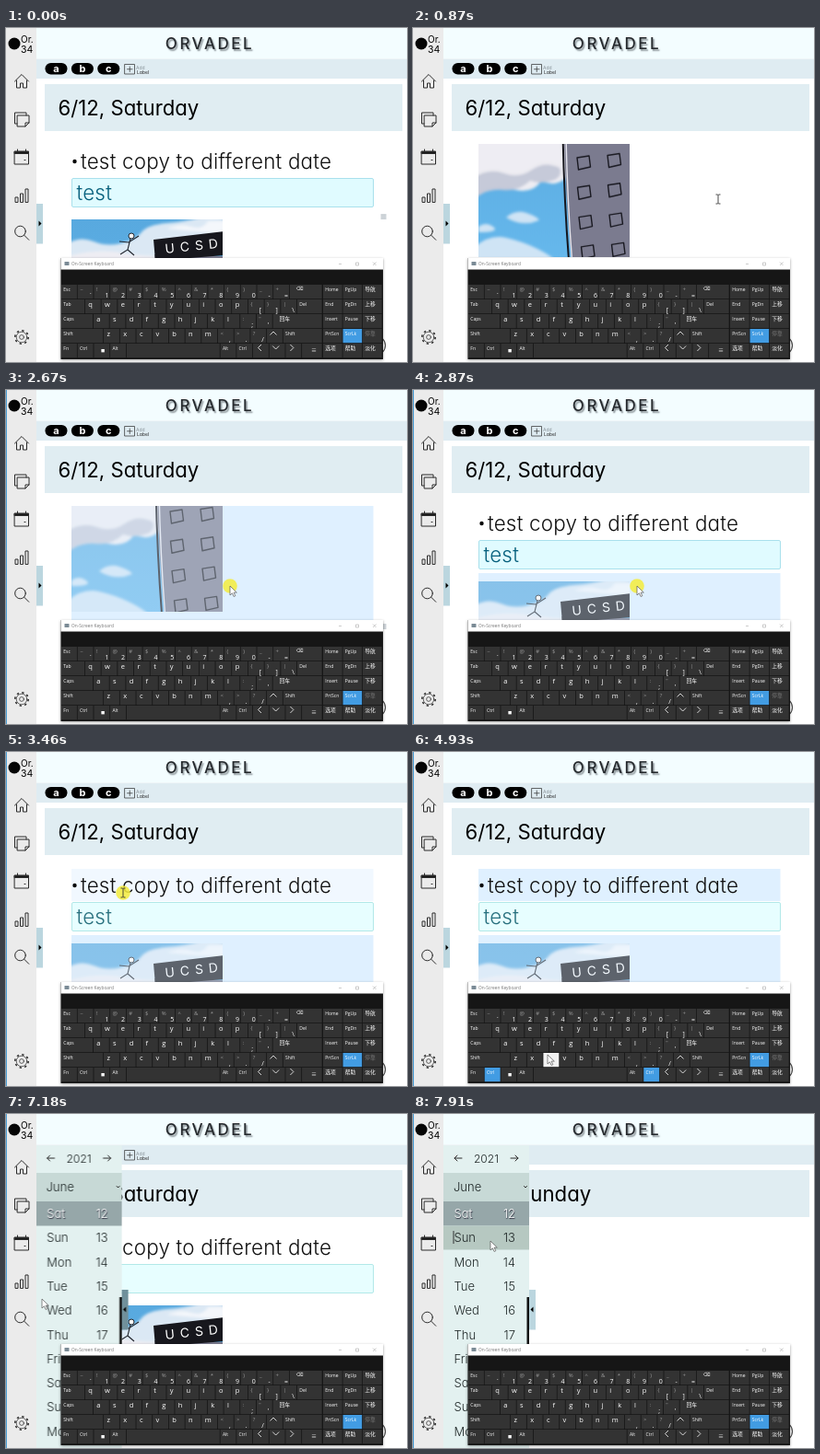
Recreate the animation shown at these times as an HTML page. Size 435 px wide and 363 px high, loop 8 s.

```html
<!DOCTYPE html>
<html lang="en">
<head>
<meta charset="utf-8">
<title>Planner</title>
<style>
html, body { margin: 0; width: 100%; height: 100%; overflow: hidden; background: #fff; }
body > svg { display: block; width: 435px; height: 363px; }
text { font-family: Inter, Lato, sans-serif; font-feature-settings: "cv11"; }
.line { fill: none; stroke: #2a2a2a; stroke-width: 1; stroke-linecap: round; stroke-linejoin: round; }
.brand { font-size: 17px; font-weight: 500; letter-spacing: 2.5px; fill: #25292d; text-shadow: 1.5px 1.5px 1.5px #8b9499; }
.date { font-size: 22.2px; fill: #000; }
.note { font-size: 22.4px; font-weight: 300; letter-spacing: .2px; fill: #111; }
.pill { font: 700 11px Inter, sans-serif; fill: #fff; text-anchor: middle; }
.side text { font-size: 13px; font-weight: 300; fill: #1e2626; }
.side .num { text-anchor: end; }
.side .chosen { fill: #fff; text-shadow: .6px .6px 1px #223; }
.keys text { font-family: "Open Sans", "Noto Sans", "Noto Sans CJK SC", "Noto Sans CJK", sans-serif; fill: #fff; }

/* one loop of 8 s: 1% is 80 ms */
.move, .hard { animation-duration: 8s; animation-iteration-count: infinite; }
.move { animation-timing-function: linear; }
.hard { animation-timing-function: step-end; }

#scroll { animation-name: scroll; }
@keyframes scroll {
  0%, 1% { transform: translateY(0); animation-timing-function: ease-in-out; }
  10.875% { transform: translateY(-130px); animation-timing-function: ease-out; }
  13.75%, 33.6% { transform: translateY(-139px); animation-timing-function: ease-in-out; }
  35.875%, 100% { transform: translateY(0); }
}
#cursor { animation-name: cursor; animation-timing-function: ease-in-out; }
@keyframes cursor {
  0%, 2.5% { transform: translate(418px, 346px); }
  8.75%, 11.1% { transform: translate(331px, 186px); }
  20.75%, 26% { transform: translate(303px, 233px); }
  33.3%, 36.25% { transform: translate(243px, 213px); }
  43.2% { transform: translate(127px, 153px); }
  46.1%, 50% { transform: translate(123px, 148px); }
  54.75%, 56.5% { transform: translate(88px, 346px); }
  59.5%, 70% { transform: translate(146px, 329px); }
  72.5%, 73.75% { transform: translate(88px, 346px); }
  79.75%, 90.5% { transform: translate(39px, 201px); }
  96.25%, 100% { transform: translate(84px, 138px); }
}
#arrow { animation-name: arrow; }
@keyframes arrow { 0% { opacity: 0 } 2.5% { opacity: 1 } 5% { opacity: 0 } 26% { opacity: 1 } 41% { opacity: 0 } 50.5%, 100% { opacity: 1 } }
#beam { animation-name: beam; }
@keyframes beam { 0% { opacity: 0 } 5% { opacity: 1 } 26% { opacity: 0 } 41% { opacity: 1 } 50.5%, 100% { opacity: 0 } }
#halo { animation-name: halo; }
@keyframes halo { 0% { opacity: 0 } 26% { opacity: 1 } 48% { opacity: 0 } 50% { opacity: 1 } 60% { opacity: 0 } 70% { opacity: 1 } 84.4% { opacity: 0 } 90.5% { opacity: 1 } 96.5%, 100% { opacity: 0 } }

#pick1 { animation-name: pick1; }
@keyframes pick1 { 0%, 41.5% { opacity: 0 } 43.25% { opacity: .45 } 46%, 84.9% { opacity: 1 } 86%, 100% { opacity: 0 } }
#pick3 { animation-name: pick3; }
@keyframes pick3 { 0%, 26.5% { opacity: 0 } 28%, 84.9% { opacity: 1 } 86%, 100% { opacity: 0 } }
#photo { animation-name: photo; }
@keyframes photo { 0%, 26.5% { opacity: 1 } 28%, 74.5% { opacity: .65 } 76%, 100% { opacity: 1 } }
#field { animation-name: field; }
@keyframes field { 0% { fill: #e0fbff; stroke: #a9e0ec } 35.9%, 100% { fill: #e7feff; stroke: #b2e8e8 } }
#fieldText { animation-name: fieldText; }
@keyframes fieldText { 0% { fill: #07607d } 35.9%, 100% { fill: #28707e } }
#grip1 { animation-name: grip1; }
@keyframes grip1 { 0% { opacity: 1 } 1.5%, 100% { opacity: 0 } }
#grip2 { animation-name: grip2; }
@keyframes grip2 { 0% { opacity: 0 } 26.5% { opacity: 1 } 35%, 100% { opacity: 0 } }
#edge { animation-name: edge; }
@keyframes edge { 0% { opacity: 0 } 11.2%, 100% { opacity: 1 } }

.ctrlHit { animation-name: ctrlHit; }
@keyframes ctrlHit { 0% { opacity: 0 } 55.6% { opacity: 1 } 73%, 100% { opacity: 0 } }
.cHit { animation-name: cHit; }
@keyframes cHit { 0% { opacity: 0 } 60.1% { opacity: 1 } 66.7%, 100% { opacity: 0 } }

#side { animation-name: side; animation-timing-function: ease-in-out; }
@keyframes side { 0%, 85% { transform: translateX(-93px) } 90%, 100% { transform: translateX(0) } }
#tab { animation-name: tab; }
@keyframes tab { 0% { fill: #bbd6df } 79.5% { fill: #70909b } 91.5%, 100% { fill: #bbd6df } }
#right { animation-name: right; }
@keyframes right { 0% { opacity: 1 } 79.5%, 100% { opacity: 0 } }
#left { animation-name: left; }
@keyframes left { 0% { opacity: 0 } 88%, 100% { opacity: 1 } }
#hover { animation-name: hover; }
@keyframes hover { 0% { opacity: 0 } 95.6%, 100% { opacity: 1 } }
#before { animation-name: before; }
@keyframes before { 0% { opacity: 1 } 98.6%, 100% { opacity: 0 } }
#after { animation-name: after; }
@keyframes after { 0% { opacity: 0 } 98.6%, 100% { opacity: 1 } }
</style>
</head>
<body>
<svg viewBox="0 0 435 363" xmlns="http://www.w3.org/2000/svg">
  <defs>
    <clipPath id="page"><rect x="42" y="126" width="393" height="230"/></clipPath>
    <clipPath id="drawer"><rect x="33" y="34" width="402" height="329"/></clipPath>
    <linearGradient id="sky" x2="0" y2="1"><stop stop-color="#58a9df"/><stop offset="1" stop-color="#66b8ec"/></linearGradient>
    <filter id="soft"><feGaussianBlur stdDeviation="1.6"/></filter>
    <filter id="shade" x="-5%" y="-10%" width="110%" height="120%"><feDropShadow dx="0" dy="1" stdDeviation="1.5" flood-opacity=".4"/></filter>
    <g id="grip" fill="#8a99a3"></g>
  </defs>

  <rect width="435" height="363" fill="#fff"/>
  <rect x="33" width="402" height="33" fill="#f3fdff"/>
  <rect x="33" y="33.500" width="402" height="21.500" fill="#dfecf2"/>
  <rect x="42" y="61" width="388" height="51" fill="#e0edf2"/>
  <text class="brand" x="221" y="23" text-anchor="middle">ORVADEL</text>
  <circle cx="401" cy="345" r="10.500" fill="#fff" stroke="#444" stroke-width="1.100"/>

  <text id="after" class="date hard" x="56.500" y="95">6/13, Sunday</text>

  <g id="before" class="hard">
    <g id="pills"></g>
    <path class="line" d="M129 39.500h10.500v10.500h-10.500zM131.500 44.750h5.500M134.250 42v5.500" style="stroke-width:.7"/>
    <text x="141" y="45" font-size="5" fill="#8a949a">Add</text>
    <text x="142" y="50" font-size="5" fill="#222">Label</text>
    <text class="date" x="56.500" y="95">6/12, Saturday</text>

    <g clip-path="url(#page)">
      <g id="scroll" class="move">
        <rect id="pick1" class="move" x="71" y="127" width="327.500" height="35" fill="#dff0ff"/>
        <circle cx="74.500" cy="145" r="2.200"/>
        <text class="note" x="81" y="152.500">test copy to different date</text>
        <rect id="field" class="hard" x="71.500" y="163.500" width="327" height="31" rx="1.500"/>
        <text id="fieldText" class="note hard" x="76.500" y="187">test</text>
        <rect id="pick3" class="move" x="71" y="199" width="327.500" height="191" fill="#dff0ff"/>
        <g id="photo" class="move">
          <svg x="71" y="208" width="164" height="172">
            <rect width="164" height="172" fill="url(#sky)"/>
            <g filter="url(#soft)">
              <path d="M-4 26q14-8 28-2t30 2 22-12 28-10 34-6 30 2v26H96L90 60H-4z" fill="#dbe8f4"/>
              <path d="M104 10q14-6 26-2t18-6h20v14z" fill="#f4f7fb"/>
              <path d="M-4 40q30-8 56-4t44 4v44q-12 12-28 4-8 14-28 10T-4 104z" fill="#eeedf3"/>
              <path d="M-4 84q16-10 32-4t30-4 30-2q4 10-8 14-12 4-24 0-12 12-30 10T-4 108z" fill="#c6cad9"/>
              <path d="M30 128q10-9 22-5t14 8q-18 8-36-3zM-4 160q16-14 34-10t34 12 20 14H-4zM0 138q8-6 16 0t-16 6z" fill="#cfe4f5"/>
            </g>
            <path d="M93 40H166V174H101Q94 100 93 40z" fill="#7b7b8f"/>
            <path d="M91.500 38Q93 110 98 174" fill="none" stroke="#15151c" stroke-width="2"/>
            <path d="M95 40Q96.500 110 101.500 174" fill="none" stroke="#e6e6ee" stroke-width="1.400"/>
            <path d="M89 22L166 13V39L91 45z" fill="#17171d"/>
            <text transform="translate(102 37) rotate(-6)" font-size="14" letter-spacing="6" style="fill:#fff">UCSD</text>
            <path d="M52 24L62 25L73 18M64 21L61 33L53 38M61 33L68 39" fill="none" stroke="#20242c" stroke-width="1.100"/>
            <circle cx="65" cy="18" r="3" fill="#fff" stroke="#20242c"/>
            <g id="windows" fill="none" stroke="#1a1a22" stroke-width="1.400" stroke-linejoin="round"></g>
          </svg>
        </g>
      </g>
    </g>
    <use id="grip1" class="hard" href="#grip" x="409.500" y="205"/>
    <use id="grip2" class="hard" href="#grip" x="409.500" y="257"/>
  </g>

  <g clip-path="url(#drawer)">
    <g id="side" class="side move">
      <rect x="33" y="34" width="93" height="329" fill="#e3f1f0"/>
      <path class="line" d="M53 48h-8m3-3l-3 3 3 3M106 48h8m-3-3l3 3-3 3"/>
      <text x="66" y="52.500" style="font-size:12px">2021</text>
      <rect x="33" y="64" width="93" height="31" fill="#c7d9d6"/>
      <text x="44" y="84">June</text>
      <path class="line" d="M120.500 78.500l1.500 1.500 1.500-1.500"/>
      <rect x="33" y="95" width="93" height="26.500" fill="#96a7a9"/>
      <g id="hover" class="hard">
        <rect x="33" y="121.500" width="93" height="26" fill="#b6c8c1"/>
        <path d="M44 127v14" stroke="#222" stroke-width=".9"/>
      </g>
      <g id="days"></g>
      <rect x="123.500" y="199" width="2.500" height="70" fill="#111"/>
      <rect id="tab" class="hard" x="126" y="191" width="7" height="43.500"/>
      <path id="right" class="hard" d="M128.500 209.500l3 3-3 3z"/>
      <path id="left" class="hard" d="M130.500 209.500l-3 3 3 3z"/>
    </g>
  </g>

  <rect width="33" height="363" fill="#ebebeb"/>
  <circle cx="9" cy="17" r="6.500" fill="#050505"/>
  <text x="16" y="15.500" font-size="10">Or.</text>
  <text x="16" y="26.500" font-size="10.500">34</text>
  <g class="line">
    <path d="M9.500 58L17 50.500l7.500 7.500M11.500 57v8h4v-5h3v5h4v-8"/>
    <path d="M12 104H9.500V92H22v3M12.500 95h12.500v8l-4 4h-8.500zM25 103h-4v4"/>
    <path d="M9.500 134h15v14h-15zM12.500 132v3M21.500 132v3M20 143.500h1"/>
    <path d="M9.500 134.500h15v2h-15z" fill="#1b1b1b"/>
    <path d="M10 189v-5h3v5zM15.500 189v-9h3v9zM21 189v-14h3v14z"/>
    <circle cx="15.500" cy="221" r="5.800"/><path d="M19.800 225.300l5 5"/>
    <g stroke-width=".7">
      <circle cx="17" cy="336" r="5.800"/><circle cx="17" cy="336" r="2.400"/>
      <circle cx="17" cy="336" r="7.200" stroke-width="1.600" stroke-dasharray="2.300 3.355" stroke-linecap="butt"/>
    </g>
  </g>
  <rect id="edge" class="hard" width="1" height="363" fill="#4d9fd6"/>

  <g class="keys">
    <rect x="59.500" y="250" width="349.500" height="110" fill="#191919" filter="url(#shade)"/>
    <rect x="59.500" y="250" width="349.500" height="12.500" fill="#fff"/>
    <rect x="63.500" y="254" width="5" height="4" rx=".6" fill="#7b8b96"/>
    <text x="71" y="258" font-size="4.800" style="fill:#777">On-Screen Keyboard</text>
    <path d="M361 256.500h3M379.500 255h3v3h-3zM398 254.500l3.500 3.500m0-3.500l-3.500 3.500" fill="none" stroke="#aaa" stroke-width=".6"/>
    <g id="keys"></g>
  </g>

  <g id="cursor" class="move">
    <circle id="halo" class="hard" r="7.800" fill="#f4ec3c" fill-opacity=".85"/>
    <path id="arrow" class="hard" d="M0 0v10l2.400-2.200 1.700 3.700 1.700-.8-1.700-3.600h3.200z" fill="#fff" stroke="#555" stroke-width=".7"/>
    <path id="beam" class="hard" d="M-2.500-5h2l.5.500.5-.500h2M0-4.500v9M-2.500 5h2l.5-.5.5.5h2" fill="none" stroke="#333" stroke-width=".9"/>
  </g>
</svg>
<script>
const NS = "http://www.w3.org/2000/svg";
const byId = id => document.getElementById(id);

function add(parent, tag, attrs, text) {
  const el = document.createElementNS(NS, tag);
  for (const name in attrs) el.setAttribute(name, attrs[name]);
  if (text) el.textContent = text;
  return parent.appendChild(el);
}

for (let i = 0; i < 9; i++)
  add(byId("grip"), "rect", { x: i % 3 * 2 - 2.6, y: Math.floor(i / 3) * 2 - 2.6, width: 1.3, height: 1.3 });

[..."abc"].forEach((label, i) => {
  const x = 54.5 + i * 28.4;
  add(byId("pills"), "rect", { x: x - 12, y: 38, width: 24, height: 12.5, rx: 6.2 });
  add(byId("pills"), "text", { x, y: 48, class: "pill" }, label);
});

// hand-drawn windows, leaning right towards the bottom
for (let row = 0; row < 4; row++) {
  for (const col of [0, 1]) {
    const x = 107 + col * 33 + row * row * 0.5;
    const y = 62 + row * 32.3 - col * 2.5;
    add(byId("windows"), "path", { d: `M${x} ${y + 1}l13-2 1.500 12-13 3z` });
  }
}

const names = ["Sun", "Mon", "Tue", "Wed", "Thu", "Fri", "Sat"];
for (let i = 0; i < 10; i++) {
  const y = 113 + i * 26.3;
  const kind = i ? "" : "chosen";
  add(byId("days"), "text", { x: 44.5, y, class: kind }, names[(i + 6) % 7]);
  add(byId("days"), "text", { x: 111, y, class: "num " + kind }, String(12 + i));
}

const UNIT = 17.7, BLUE = "#429ce3";
const keys = byId("keys");
const rows = [
  [1, "Esc ~` !1 @2 #3 $4 %5 ^6 &7 *8 (9 )0 _- += ⌫"],
  [1.46, "Tab q w e r t y u i o p {[ }] |\\ Del"],
  [1.97, "Caps a s d f g h j k l :; \"' 回车"],
  [2.6, "Shift z x c v b n m <, >. ?/ ∧ Shift"],
  [1, "Fn Ctrl ■ Alt space Alt Ctrl < ∨ > ≡"]
];
const extras = ["Home PgUp 导航", "End PgDn 上移", "Insert Pause 下移", "PrtScn ScrLk 停靠", "选项 帮助 淡化"];

function drawKey(label, x, y, width) {
  const box = { x, y, width: width - 0.8, height: 15.2 };
  add(keys, "rect", { ...box, fill: label === "ScrLk" ? BLUE : "#333" });
  if (label === "Ctrl") add(keys, "rect", { ...box, fill: BLUE, class: "ctrlHit hard" });
  if (label === "c") add(keys, "rect", { ...box, fill: "#f2f2f2", class: "cHit hard" });
  if (label === "space") return;

  const put = (text, dx, dy, size, style = "") =>
    add(keys, "text", { x: x + dx, y: y + dy, "font-size": size, style }, text);
  if (/^[!-@[-`{-~]{2}$/.test(label)) {
    put(label[0], 2.5, 7, 6, "fill:#999");
    put(label[1], 12, 13.5, 7);
  } else if (/^[a-z]$/.test(label)) {
    put(label, 3.5, 8, 7.5);
  } else if (/^[<>∧∨]$/.test(label)) {
    const turn = { "<": 0, "∧": 90, ">": 180, "∨": 270 }[label];
    add(keys, "path", { d: "M2-3.500l-3.500 3.500 3.500 3.500", fill: "none", stroke: "#fff", "stroke-width": 0.8,
      transform: `translate(${x + 7} ${y + 4.5}) rotate(${turn})` });
  } else if (label === "■") {
    add(keys, "rect", { x: x + 8, y: y + 6, width: 3.4, height: 3.4, fill: "#fff" });
  } else if (label === "≡") {
    put(label, 10, 9, 6);
  } else if (label === "⌫") {
    put(label, 7, 6, 5.5, "font-family:'DejaVu Sans',sans-serif");
  } else {
    const wide = label > "一";
    put(label, label === "回车" ? 7 : 2.3, 6.5, wide ? 5.8 : 5, label === "停靠" ? "fill:#777" : "");
  }
}

rows.forEach(([first, line], r) => {
  const y = 279 + r * 16;
  const labels = line.split(" ");
  let x = 60;
  labels.forEach((label, i) => {
    let width = (i === 0 ? first : label === "space" ? 5.75 : 1) * UNIT;
    if (i === labels.length - 1) width = 343.5 - x;
    drawKey(label, x, y, width);
    x += width;
  });
  extras[r].split(" ").forEach((label, i) => drawKey(label, 344 + i * 21.5, y, 21.5));
});
</script>
</body>
</html>
```
